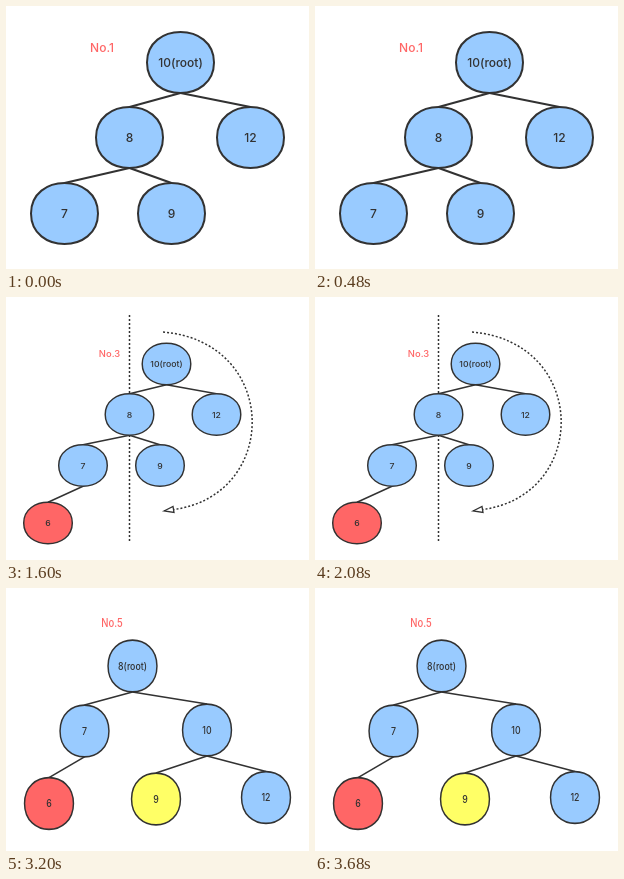
These frames come from a looping animation (303 by 263 pixels, 4000 ms). An HTML page with a canvas:

```html
<!DOCTYPE html>
<html lang="en">
<head>
<meta charset="utf-8">
<style>
  html, body { margin: 0; width: 100%; height: 100%; overflow: hidden; background: #fff; }
  canvas { display: block; }
</style>
</head>
<body>
<canvas id="stage" width="303" height="263"></canvas>
<script>
const ctx = document.getElementById('stage').getContext('2d');
const INK = '#323232', BLUE = '#99cbff', RED = '#ff6666', YELLOW = '#ffff66';
const NODE_W = 67, NODE_H = 61, STEP_MS = 800;

// Each scene shows the same diagram style at its own zoom.
// Nodes: text, x, y, index of parent, fill.
const scenes = [
  { zoom: [1, 1], title: ['No.1', 96, 41, '500 12px'], nodes: [
    ['10(root)', 174.5, 56.5], ['8', 123.5, 131.5, 0], ['12', 244.5, 131.5, 0],
    ['7', 58.5, 207.5, 1], ['9', 165.5, 207.5, 1]] },
  { zoom: [0.866, 0.76], title: ['No.2', 124, 31, '700 13px'], nodes: [
    ['10(root)', 192, 43], ['8', 148, 99.5, 0], ['12', 252.5, 99.5, 0],
    ['7', 92, 157, 1], ['9', 184.5, 157, 1], ['6', 50.5, 221, 3, RED]] },
  { zoom: [0.725, 0.68], title: ['No.3', 103.5, 57, '500 13px'], turning: true, nodes: [
    ['10(root)', 160.5, 67], ['8', 123.5, 117.5, 0], ['12', 210.5, 117.5, 0],
    ['7', 77, 168.5, 1], ['9', 154, 168.5, 1], ['6', 42, 226, 3, RED]] },
  { zoom: [0.725, 0.68], title: ['No.4', 103.5, 57, '500 13px'], turning: true, nodes: [
    ['8', 123.5, 117.5], ['7', 77, 168.5, 0], ['9', 154, 168.5, 0, YELLOW],
    ['10(root)', 210.5, 168, 0], ['6', 42, 226, 1, RED], ['12', 254, 218.5, 3]] },
  { zoom: [0.73, 0.85], title: ['No.5', 106, 35, '500 13px'], nodes: [
    ['8(root)', 126.5, 78], ['7', 78.5, 143, 0], ['10', 201, 142, 0],
    ['6', 43, 215.5, 1, RED], ['9', 150, 211, 2, YELLOW], ['12', 260, 209.5, 2]] }
];

function zoomedAt(x, y, [sx, sy], draw) {
  ctx.save();
  ctx.translate(x, y);
  ctx.scale(sx, sy);
  draw();
  ctx.restore();
}

function drawText(text, font, color) {
  ctx.font = font + ' Inter, sans-serif';
  ctx.fillStyle = color;
  ctx.fillText(text, 0, 1);
}

function drawNode([text, x, y, , fill = BLUE], zoom) {
  zoomedAt(x, y, zoom, () => {
    const w = NODE_W / 2, bulge = NODE_H * 2 / 3;
    ctx.beginPath();
    ctx.moveTo(-w, 0);
    ctx.bezierCurveTo(-w, -bulge, w, -bulge, w, 0);
    ctx.bezierCurveTo(w, bulge, -w, bulge, -w, 0);
    ctx.fillStyle = fill;
    ctx.fill();
    ctx.lineWidth = 2;
    ctx.stroke();
    drawText(text, '500 12px', INK);
  });
}

function drawEdge([, x1, y1], [, x2, y2], [sx, sy]) {
  const half = NODE_H * sy / 2;
  ctx.lineWidth = sx + sy;
  ctx.beginPath();
  ctx.moveTo(x1, y1 + half);
  ctx.lineTo(x2, y2 - half);
  ctx.stroke();
}

function drawTurn() {
  ctx.lineWidth = 1.5;
  ctx.setLineDash([2, 2]);
  ctx.beginPath();
  ctx.moveTo(123.5, 18);
  ctx.lineTo(123.5, 245);
  ctx.moveTo(157, 35);
  ctx.bezierCurveTo(274, 45, 274, 198, 168, 212.5);
  ctx.stroke();
  ctx.setLineDash([]);
  ctx.beginPath();
  ctx.moveTo(158, 214);
  ctx.lineTo(167, 209.5);
  ctx.lineTo(168, 215.5);
  ctx.closePath();
  ctx.fillStyle = '#fff';
  ctx.fill();
  ctx.lineWidth = 1.3;
  ctx.stroke();
}

function drawScene({ zoom, title, nodes, turning }) {
  ctx.fillStyle = '#fff';
  ctx.fillRect(0, 0, 303, 263);
  ctx.strokeStyle = INK;
  ctx.textAlign = 'center';
  ctx.textBaseline = 'middle';
  if (turning) drawTurn();
  for (const node of nodes) {
    if (node[3] !== undefined) drawEdge(nodes[node[3]], node, zoom);
  }
  for (const node of nodes) drawNode(node, zoom);
  const [text, x, y, font] = title;
  zoomedAt(x, y, zoom, () => drawText(text, font, RED));
}

const start = performance.now();
function tick() {
  const step = Math.floor((performance.now() - start) / STEP_MS);
  drawScene(scenes[step % scenes.length]);
  requestAnimationFrame(tick);
}
tick();
</script>
</body>
</html>
```
